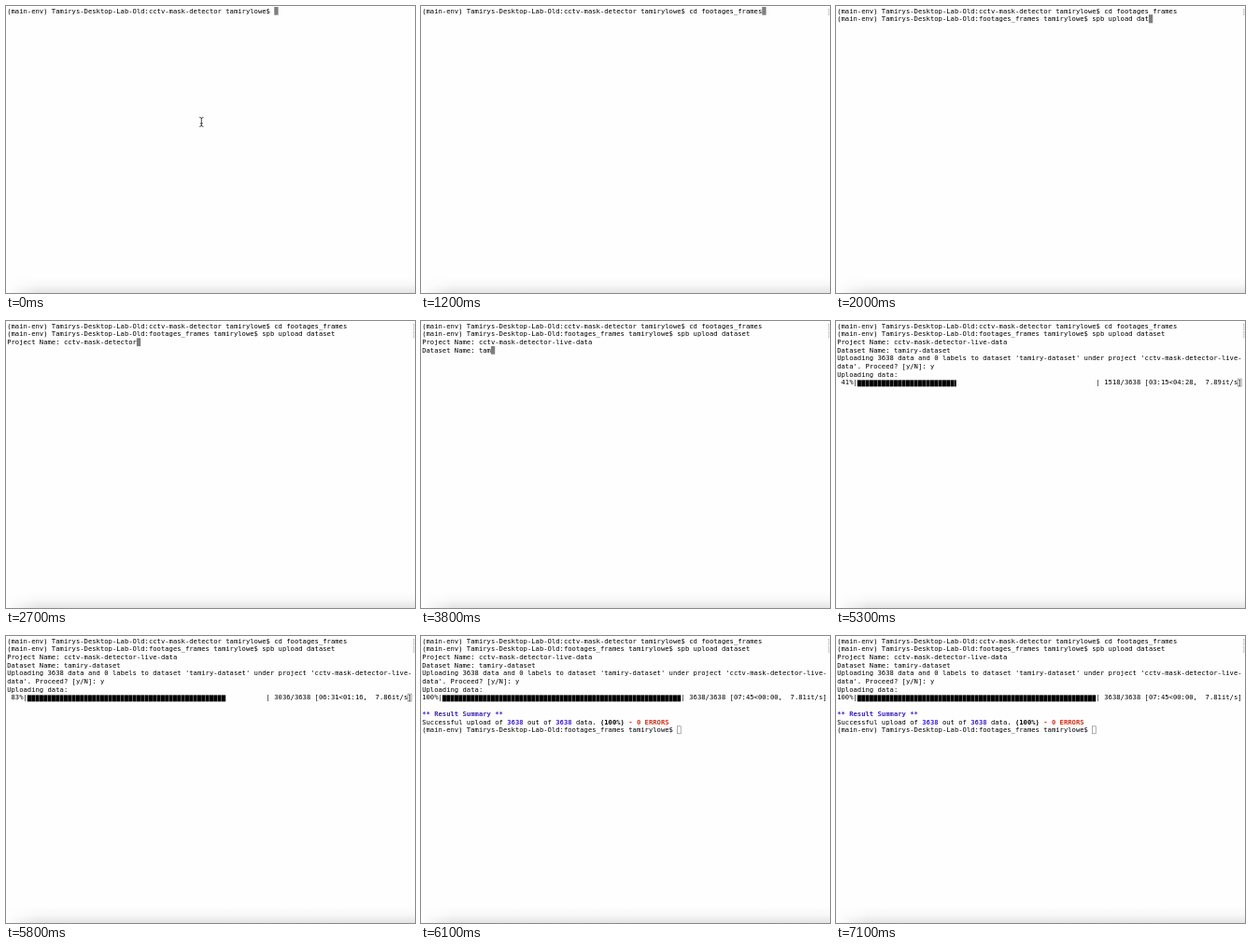
Animation, 438 px wide and 308 px high, one loop 7.2 s. Source, as an HTML page with a canvas:

```html
<!DOCTYPE html>
<html lang="en">
<head>
<meta charset="utf-8">
<title>Dataset upload in a terminal</title>
<style>
  html, body { margin: 0; width: 100%; height: 100%; overflow: hidden; background: #fefefe; }
  canvas { display: block; width: 438px; height: 308px; }
</style>
</head>
<body>
<canvas id="stage" width="438" height="308"></canvas>
<script>
const ctx = document.getElementById('stage').getContext('2d');
const LOOP = 7200, COLS = 100, TOTAL = 3638;
const CELL = 4.334, LINE = 8.68, LEFT = 1.2, TOP = 1, BASE = 6.7;
const INK = '#000', BLUE = '#3c22cc', RED = '#c23621';

const HOST = '(main-env) Tamirys-Desktop-Lab-Old:';
const USER = ' tamirylowe$ ';
const PROMPT_1 = HOST + 'cctv-mask-detector' + USER;
const PROMPT_2 = HOST + 'footages_frames' + USER;
const PROJECT = 'cctv-mask-detector-live-data';
const DATASET = 'tamiry-dataset';
const QUESTION = `Uploading ${TOTAL} data and 0 labels to dataset '${DATASET}' under project '${PROJECT}'. Proceed? [y/N]: `;

// Each typing burst: [time, characters visible from then on]
const CD_KEYS = [[300, 3], [500, 4], [900, 7], [1000, 11], [1100, 15], [1200, 18]];
const SPB_KEYS = [[1500, 1], [1700, 3], [1800, 6], [1900, 10], [2000, 14], [2100, 18]];
const PROJECT_KEYS = [[2500, 6], [2600, 12], [2700, 18], [2800, 22], [2900, 25], [3000, 28]];
const DATASET_KEYS = [[3800, 3], [3900, 8], [4000, 14]];

const colX = col => LEFT + col * CELL;
const rowY = row => TOP + row * LINE;

function typed(text, keys, t) {
  let shown = 0;
  for (const [time, count] of keys) if (t >= time) shown = count;
  return text.slice(0, shown);
}

function write(text, col, row, color = INK, bold = false) {
  ctx.font = `${bold ? 'bold ' : ''}72px "DejaVu Sans Mono", monospace`;
  ctx.fillStyle = color;
  [...text].forEach((ch, i) => {
    if (ch === ' ') return;
    ctx.save();
    ctx.translate(colX(col + i), rowY(row) + BASE);
    ctx.scale(0.1, 0.1);
    ctx.fillText(ch, 0, 0);
    ctx.restore();
  });
}

function writeParts(parts, row) {
  let col = 0;
  for (const [text, color, bold] of parts) {
    write(text, col, row, color, bold);
    col += text.length;
  }
}

function clock(seconds) {
  const two = n => String(n).padStart(2, '0');
  return two(Math.floor(seconds / 60)) + ':' + two(Math.floor(seconds % 60));
}

function progress(t) {
  const step = t < 4900 ? 0 : Math.floor((t - 4900) / 100) + 1;
  const done = Math.min(TOTAL, Math.round(step * 303.6));
  const rate = 7.86 + 0.05 * Math.sin(2 * (step - 10));
  let times = '00:00<?, ?it/s';
  if (done === TOTAL) times = '07:45<00:00,  7.81it/s';
  else if (done) times = `${clock(done * 0.1288)}<${clock((TOTAL - done) / rate)},  ${rate.toFixed(2)}it/s`;
  return { part: done / TOTAL, stats: `| ${done}/${TOTAL} [${times}]` };
}

function drawProgress(t, row) {
  const { part, stats } = progress(t);
  const start = COLS - stats.length;
  write(String(Math.floor(part * 100)).padStart(3) + '%|', 0, row);
  write(stats, start, row);
  const filled = Math.floor(part * (start - 5) * 8) / 8;
  ctx.fillStyle = INK;
  for (let i = 0; i < filled; i++) {
    const width = Math.min(1, filled - i) * CELL - 0.3;
    ctx.fillRect(colX(5 + i), rowY(row) + 1.6, width, 7);
  }
}

function drawCaret(row, col, hollow) {
  const x = colX(col), y = rowY(row);
  if (hollow) {
    ctx.strokeStyle = '#8a8a8a';
    ctx.lineWidth = 0.7;
    ctx.strokeRect(x + 0.35, y + 0.35, CELL - 0.7, LINE - 0.7);
  } else {
    ctx.fillStyle = '#7f7f7f';
    ctx.fillRect(x, y, CELL, LINE);
  }
}

function drawPointer() {
  ctx.strokeStyle = '#333';
  ctx.lineWidth = 0.9;
  ctx.beginPath();
  ctx.moveTo(207.2, 119.5);
  ctx.quadraticCurveTo(209.3, 119.5, 209.3, 121);
  ctx.quadraticCurveTo(209.3, 119.5, 211.4, 119.5);
  ctx.moveTo(209.3, 121);
  ctx.lineTo(209.3, 128);
  ctx.moveTo(207.2, 129.4);
  ctx.quadraticCurveTo(209.3, 129.4, 209.3, 127.9);
  ctx.quadraticCurveTo(209.3, 129.4, 211.4, 129.4);
  ctx.moveTo(207.9, 126);
  ctx.lineTo(210.7, 126);
  ctx.stroke();
}

function drawShade() {
  const down = ctx.createLinearGradient(0, 290, 0, 308);
  down.addColorStop(0, 'rgba(0,0,0,0)');
  down.addColorStop(0.5, 'rgba(0,0,0,0.025)');
  down.addColorStop(1, 'rgba(0,0,0,0.1)');
  ctx.fillStyle = down;
  ctx.fillRect(0, 290, 438, 18);
  const left = ctx.createLinearGradient(0, 0, 34, 0);
  left.addColorStop(0, 'rgba(254,254,254,1)');
  left.addColorStop(0.2, 'rgba(254,254,254,0.8)');
  left.addColorStop(1, 'rgba(254,254,254,0)');
  ctx.fillStyle = left;
  ctx.fillRect(0, 290, 34, 18);
}

function textRows(t) {
  const rows = [PROMPT_1 + typed('cd footages_frames', CD_KEYS, t)];
  if (t >= 1400) rows.push(PROMPT_2 + typed('spb upload dataset', SPB_KEYS, t));
  if (t >= 2200) rows.push(t < 2400 ? '' : 'Project Name: ' + typed(PROJECT, PROJECT_KEYS, t));
  if (t >= 3100) rows.push('Dataset Name: ' + typed(DATASET, DATASET_KEYS, t));
  if (t >= 4100 && t < 4300) rows.push('');
  if (t >= 4300) {
    const line = QUESTION + (t >= 4600 ? 'y' : '');
    rows.push(line.slice(0, COLS), line.slice(COLS));
  }
  if (t >= 4700) rows.push('Uploading data:');
  return rows;
}

function drawSummary() {
  writeParts([['** Result Summary **', BLUE, true]], 9);
  writeParts([
    ['Successful upload of '], [`${TOTAL}`, BLUE, true],
    [' out of '], [`${TOTAL}`, BLUE, true],
    [' data. '], ['(100%)', INK, true], [' '], ['- 0 ERRORS', RED, true]
  ], 10);
  write(PROMPT_2, 0, 11);
}

function draw(t) {
  ctx.fillStyle = '#fefefe';
  ctx.fillRect(0, 0, 438, 308);
  drawShade();

  const rows = textRows(t);
  if (t >= 6100) drawCaret(11, PROMPT_2.length, true);
  else if (t >= 4700) drawCaret(7, COLS - 1, t >= 4900);
  else drawCaret(rows.length - 1, rows[rows.length - 1].length, false);

  rows.forEach((text, row) => write(text, 0, row));
  if (t >= 1200) write(']', COLS, 0, '#aaa');
  if (t >= 2100) write(']', COLS, 1, '#aaa');
  if (t >= 4700) drawProgress(t, 7);
  if (t >= 6100) drawSummary();
  if (t < 300) drawPointer();
}

const begin = performance.now();
function tick() {
  draw((performance.now() - begin) % LOOP);
  requestAnimationFrame(tick);
}
tick();
</script>
</body>
</html>
```
